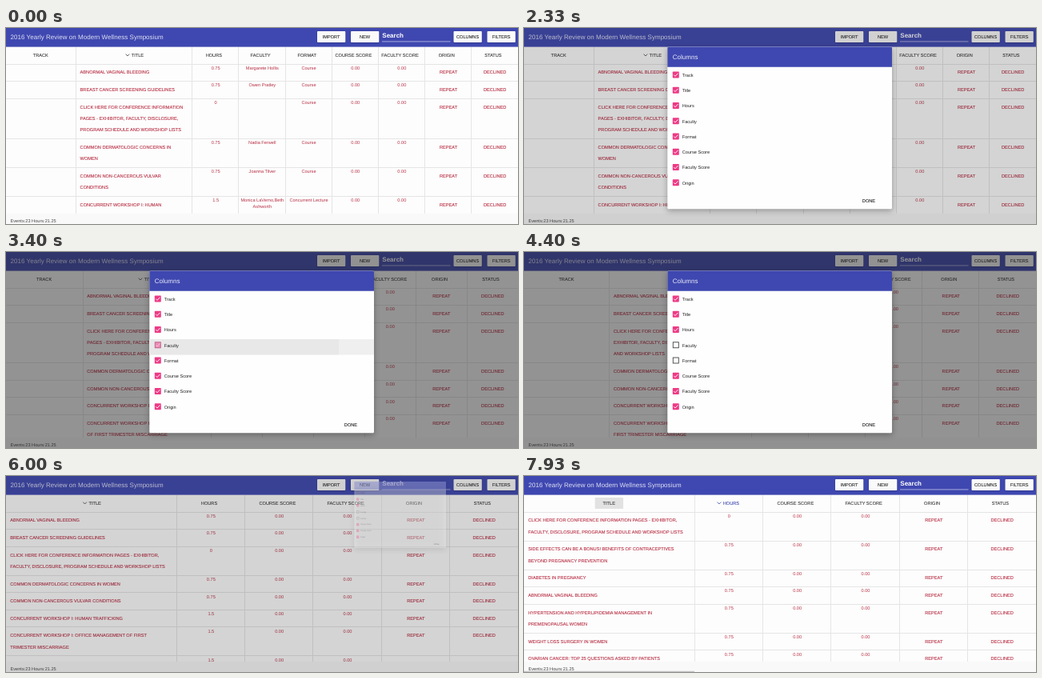
These frames come from a looping animation (640 by 245 pixels, 8000 ms). An HTML page with a canvas:

```html
<!DOCTYPE html>
<html lang="en">
<head>
<meta charset="utf-8">
<title>Conference schedule</title>
<style>
html, body { margin: 0; width: 100%; height: 100%; overflow: hidden; background: #fdfdfd; }
canvas { display: block; width: 640px; height: 245px; }
</style>
</head>
<body>
<canvas id="stage"></canvas>
<script>
const W = 640, H = 245, LOOP = 8000;
const INDIGO = '#3f48b0', RED = '#b83045', DARK = '#3c3c3c', PINK = '#ee3a86', RULE = '#e5e5e5';
const FONT = '"Liberation Sans", Arial, sans-serif';
const SIZE = 5.63, HEAD = 23.6, BODY = 45, FOOT = 232;

// Times of the user's actions
const OPEN = 2000, BACKDROP = 2155, CLOSE = 5880;
const OFF = { Faculty: 3330, Format: 3900, Track: 4970 };
const TITLE_FOCUS = 7300, SORT = 7480;

const canvas = document.getElementById('stage');
const dpr = window.devicePixelRatio || 1;
canvas.width = W * dpr;
canvas.height = H * dpr;
const ctx = canvas.getContext('2d');

const clamp = v => Math.max(0, Math.min(1, v));
const ramp = (t, start, length) => clamp((t - start) / length);
const easeOut = p => 1 - (1 - p) ** 3;

const COLUMNS = [
  ['Track', 1.5], ['Title', 2.5], ['Hours', 1], ['Faculty', 1], ['Format', 1],
  ['Course Score', 1], ['Faculty Score', 1], ['Origin', 1], ['Status', 1]
];

const event = (title, hours, faculty = [], format = 'Course') => ({ title, hours, faculty, format });
const LECTURE = 'Concurrent Lecture';
const bleeding = event('ABNORMAL VAGINAL BLEEDING', '0.75', ['Margarete Hollis']);
const info = event('CLICK HERE FOR CONFERENCE INFORMATION PAGES - EXHIBITOR, FACULTY, DISCLOSURE, PROGRAM SCHEDULE AND WORKSHOP LISTS', '0');
const BY_TITLE = [
  bleeding,
  event('BREAST CANCER SCREENING GUIDELINES', '0.75', ['Owen Pratley']),
  info,
  event('COMMON DERMATOLOGIC CONCERNS IN WOMEN', '0.75', ['Nadia Ferwell']),
  event('COMMON NON-CANCEROUS VULVAR CONDITIONS', '0.75', ['Joanna Tilver']),
  event('CONCURRENT WORKSHOP I: HUMAN TRAFFICKING', '1.5', ['Monica LaVerno,Beth', 'Ashworth'], LECTURE),
  event('CONCURRENT WORKSHOP I: OFFICE MANAGEMENT OF FIRST TRIMESTER MISCARRIAGE', '1.5', [], LECTURE),
  event('CONCURRENT WORKSHOP II', '1.5', [], LECTURE)
];
const BY_HOURS = [
  info,
  event('SIDE EFFECTS CAN BE A BONUS! BENEFITS OF CONTRACEPTIVES BEYOND PREGNANCY PREVENTION', '0.75'),
  event('DIABETES IN PREGNANCY', '0.75'),
  bleeding,
  event('HYPERTENSION AND HYPERLIPIDEMIA MANAGEMENT IN PREMENOPAUSAL WOMEN', '0.75'),
  event('WEIGHT LOSS SURGERY IN WOMEN', '0.75'),
  event('OVARIAN CANCER: TOP 25 QUESTIONS ASKED BY PATIENTS', '0.75')
];

function rect(x, y, w, h, color) {
  ctx.fillStyle = color;
  ctx.fillRect(x, y, w, h);
}

function box(x, y, w, h, color, radius = 1) {
  ctx.fillStyle = color;
  ctx.beginPath();
  ctx.roundRect(x, y, w, h, radius);
  ctx.fill();
}

function disc(x, y, r, color) {
  ctx.fillStyle = color;
  ctx.beginPath();
  ctx.arc(x, y, r, 0, 7);
  ctx.fill();
}

function line(points, color, width) {
  ctx.strokeStyle = color;
  ctx.lineWidth = width;
  ctx.beginPath();
  points.forEach(([x, y]) => ctx.lineTo(x, y));
  ctx.stroke();
}

function shadow(blur, y, alpha) {
  ctx.shadowColor = `rgba(0,0,0,${alpha})`;
  ctx.shadowBlur = blur * dpr;
  ctx.shadowOffsetY = y * dpr;
}

// y is the middle of the capitals; medium thickens the strokes slightly
function text(str, x, y, color, { size = SIZE, align = 'left', medium = false, bold = false, spacing = 0 } = {}) {
  ctx.font = `${bold ? 'bold ' : ''}${size}px ${FONT}`;
  ctx.textAlign = align;
  ctx.letterSpacing = spacing + 'px';
  ctx.fillStyle = color;
  const base = y + size * 0.36;
  ctx.fillText(str, x, base);
  if (medium) {
    ctx.strokeStyle = color;
    ctx.lineWidth = 0.1;
    ctx.strokeText(str, x, base);
  }
}

const label = (str, x, y, color) => text(str, x, y, color, { align: 'center', medium: true });
const value = (str, x, y) => text(str, x, y, RED, { align: 'center' });

function wrap(str, width) {
  ctx.font = `${SIZE}px ${FONT}`;
  ctx.letterSpacing = '0px';
  const lines = [];
  for (const word of str.split(' ')) {
    const last = lines.length - 1;
    const joined = lines[last] + ' ' + word;
    if (last >= 0 && ctx.measureText(joined).width <= width) lines[last] = joined;
    else lines.push(word);
  }
  return lines;
}

function layout(t) {
  const shown = COLUMNS.filter(([name]) => !(t >= OFF[name]));
  const unit = W / shown.reduce((sum, col) => sum + col[1], 0);
  let x = 0;
  return shown.map(([name, span]) => {
    const col = { name, x, w: span * unit, mid: x + span * unit / 2 };
    x += col.w;
    return col;
  });
}

function drawAppBar() {
  rect(0, 0, W, HEAD, INDIGO);
  text('2016 Yearly Review on Modern Wellness Symposium', 5.5, 11, '#dfe1f5', { size: 8, spacing: 0.04 });
  [['IMPORT', 389], ['NEW', 431], ['COLUMNS', 559.5], ['FILTERS', 601.5]].forEach(([name, x]) => {
    ctx.save();
    shadow(1.5, 0.6, 0.3);
    box(x, 4, 35.3, 14, '#fafafa');
    ctx.restore();
    label(name, x + 17.6, 11, '#2a2a2a');
  });
  text('Search', 470.3, 9, '#fff', { size: 8, bold: true });
  rect(470, 16.6, 85.5, 0.7, '#d5d8f0');
}

function drawHeading(col, t) {
  const sorted = col.name === (t < SORT ? 'Title' : 'Hours');
  const color = sorted && t >= SORT ? INDIGO : DARK;
  const name = col.name.toUpperCase();
  const y = 33.7;
  if (col.name === 'Title' && t >= TITLE_FOCUS) box(col.mid - 18, 27, 35.4, 14, '#e2e2e2');
  if (!sorted) {
    label(name, col.mid - (col.name === 'Track' || col.name === 'Title' ? 0.4 : 2), y, color);
    return;
  }
  const left = col.mid - (col.name === 'Title' ? 3.2 : 7.2);
  line([[left - 7.2, y - 1.1], [left - 4.9, y + 1.3], [left - 2.6, y - 1.1]], color, 0.8);
  text(name, left, y, color, { medium: true });
}

function drawCell(col, row, lines, top) {
  const first = top + 10.3, upper = top + 4.7, mid = col.mid + 0.3;
  switch (col.name) {
    case 'Title':
      lines.forEach((s, i) => text(s, col.x + 5.3, first + i * 14.4, RED, { medium: true }));
      break;
    case 'Hours': value(row.hours, mid, upper); break;
    case 'Faculty': row.faculty.forEach((s, i) => value(s, mid, upper + i * 8)); break;
    case 'Format': value(row.format, mid, upper); break;
    case 'Course Score':
    case 'Faculty Score': value('0.00', mid, upper); break;
    case 'Origin': label('REPEAT', mid, first, RED); break;
    case 'Status': label('DECLINED', mid, first, RED); break;
  }
}

function drawTable(t) {
  const cols = layout(t);
  const title = cols.find(col => col.name === 'Title');
  ctx.save();
  ctx.beginPath();
  ctx.rect(0, HEAD, W, FOOT - HEAD);
  ctx.clip();
  cols.forEach(col => {
    if (col.x) rect(Math.floor(col.x), HEAD, 1, FOOT - HEAD, RULE);
    drawHeading(col, t);
  });
  let top = BODY;
  for (const row of t < SORT ? BY_TITLE : BY_HOURS) {
    const lines = wrap(row.title, title.w - 12.5);
    rect(0, Math.floor(top), W, 1, RULE);
    cols.forEach(col => drawCell(col, row, lines, top));
    top += 21.6 + (lines.length - 1) * 14.4;
  }
  ctx.restore();
  rect(0, FOOT, W, H - FOOT, '#f9f9f9');
  text('Events:23 Hours:21.25', 5.5, 240.8, '#444');
  if (t >= SORT + 60) rect(0, 243.8, 213, 1.2, '#c4c4c4');
}

function drawCheckbox(x, y, off) {
  ctx.save();
  const alpha = ctx.globalAlpha;
  ctx.globalAlpha = alpha * off;
  ctx.strokeStyle = '#444';
  ctx.lineWidth = 0.9;
  ctx.strokeRect(x - 3.5, y - 3.5, 7, 7);
  ctx.globalAlpha = alpha * (1 - off);
  box(x - 4, y - 4, 8, 8, PINK, 0.8);
  line([[x - 2.5, y + 0.1], [x - 0.8, y + 1.8], [x + 2.7, y - 1.9]], '#fff', 0.9);
  ctx.restore();
}

// Hover tint on an option row with the ripple of the click
function drawRowPress(y, click, t) {
  const fade = 1 - ramp(t, click + 200, 150);
  if (t < click - 200 || fade === 0) return;
  ctx.save();
  ctx.beginPath();
  ctx.rect(179, y - 7.2, 281, 19.6);
  ctx.clip();
  ctx.globalAlpha = fade;
  rect(179, y - 7.2, 281, 19.6, '#f0eff0');
  if (t >= click) disc(198, y, 30 + (t - click) * 2.65, 'rgba(0,0,0,0.03)');
  ctx.restore();
}

function drawDoneButton(t) {
  if (t >= 5480) {
    ctx.save();
    ctx.beginPath();
    ctx.roundRect(413.3, 208.7, 35.4, 14, 1);
    ctx.clip();
    rect(413, 208, 36, 15, '#e0e0e0');
    if (t >= 5780) disc(433, 216, (t - 5780) * 0.14, 'rgba(0,0,0,0.06)');
    ctx.restore();
  }
  label('DONE', 431, 215.8, '#222');
}

function drawDialog(t) {
  const shown = t < CLOSE ? easeOut(ramp(t, OPEN, 320)) : 1 - ramp(t, CLOSE, 180);
  const dim = 0.48 * (t < CLOSE ? ramp(t, BACKDROP, 445) : 1 - ramp(t, CLOSE, 200));
  if (dim > 0) rect(0, 0, W, H, `rgba(33,33,33,${dim})`);
  if (shown <= 0) return;

  ctx.save();
  ctx.globalAlpha = shown;
  // Grows out of the COLUMNS button and shrinks back into it
  const scale = 0.12 + 0.88 * shown;
  ctx.translate(577 * (1 - shown) + 319.5 * shown, 11 * (1 - shown) + 125 * shown);
  ctx.scale(scale, scale);
  ctx.translate(-319.5, -125);

  ctx.save();
  shadow(7, 2.5, 0.3);
  box(179.3, HEAD, 280.7, 202.6, '#fefefe', 1.5);
  ctx.restore();
  box(179.3, HEAD, 280.7, 25.2, INDIGO, [1.5, 1.5, 0, 0]);
  text('Columns', 185.7, 36, '#e9eaf8', { size: 8, spacing: 0.04 });

  COLUMNS.slice(0, 8).forEach(([name], i) => {
    const y = 58.5 + i * 19.25, click = OFF[name];
    if (click) drawRowPress(y, click, t);
    drawCheckbox(189.8, y, click ? ramp(t, click, 150) : 0);
    text(name, 197.7, y + 0.3, '#222');
  });
  drawDoneButton(t);
  ctx.restore();
}

function draw(now) {
  const t = now % LOOP;
  ctx.setTransform(dpr, 0, 0, dpr, 0, 0);
  ctx.textRendering = 'geometricPrecision';
  rect(0, 0, W, H, '#fdfdfd');
  drawTable(t);
  drawAppBar();
  if (t >= OPEN && t < CLOSE + 200) drawDialog(t);
}

const start = performance.now();
function tick() {
  draw(performance.now() - start);
  requestAnimationFrame(tick);
}
tick();
</script>
</body>
</html>
```
